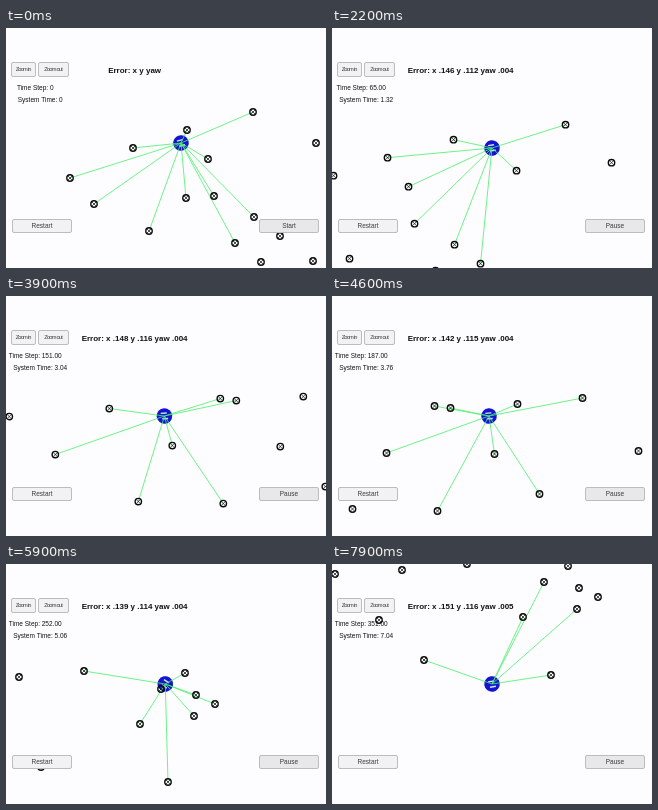
Animation of 320 by 240 pixels, one loop 8 s. Source, as an HTML page with a canvas:

```html
<!DOCTYPE html>
<html lang="en">
<head>
<meta charset="utf-8">
<title>Robot localisation</title>
<style>
  html, body { margin: 0; width: 100%; height: 100%; overflow: hidden; background: #fdfcff; }
  canvas { display: block; }
</style>
</head>
<body>
<canvas id="stage" width="320" height="240"></canvas>
<script>
const ctx = document.getElementById('stage').getContext('2d');
const SANS = '"Liberation Sans", Arial, sans-serif';
const TICK = 100, TICKS = 80, START = 10, RANGE = 119.7;

// The world map: landmark positions
const landmarks = [
  [181, 102], [247, 84], [310, 115], [127, 120], [202, 131], [64, 150], [88, 176],
  [180, 170], [208, 168], [248, 189], [143, 203], [229, 215], [274, 208], [255, 234],
  [307, 233], [359, 69], [459, 61], [405, 107], [522, 98], [488, 154], [570, 51],
  [586, 53], [653, 49], [718, 43], [630, 99], [675, 139], [573, 156], [774, 96],
  [795, 61], [819, 45], [830, 67], [849, 76], [828, 88], [802, 154]
];

// Waypoints of the drive: tick, x, y
const path = [
  [10, 19, -6], [15, 51, -15.5], [31, 235, -42], [46, 467.5, -59], [54, 588, -68],
  [59, 640, -64], [67, 673, -10], [72, 651, 32], [79, 583, 43]
];

function slope(i, k) {
  const a = path[Math.max(i - 1, 0)], b = path[Math.min(i + 1, path.length - 1)];
  return (b[k] - a[k]) / (b[0] - a[0]);
}

// Smooth cubic through the waypoints
function position(t) {
  let i = 0;
  while (i < path.length - 2 && path[i + 1][0] <= t) i++;
  const a = path[i], b = path[i + 1], span = b[0] - a[0];
  const u = (t - a[0]) / span, v = 1 - u;
  return [1, 2].map(k =>
    a[k] * (1 + 2 * u) * v * v + b[k] * u * u * (3 - 2 * u) +
    span * u * v * (slope(i, k) * v - slope(i + 1, k) * u));
}

function heading(t) {
  const a = position(t - .3), b = position(t + .3);
  return Math.atan2(b[1] - a[1], b[0] - a[0]);
}

// The errors settle quickly, then swell and fade
function errorText(t) {
  const settle = Math.exp((15 - t) / 3);
  const swell = Math.cos(Math.PI * (t - 31) / 53) ** 4;
  const show = v => Math.max(v, 0).toFixed(3).slice(1);
  const x = .1393 + .0145 * swell - .018 * settle;
  const y = .1142 + .0024 * swell - .0315 * settle;
  return `Error: x ${show(x)} y ${show(y)} yaw ${show(.004 + t * 6.8e-6)}`;
}

const timeStep = t => Math.round(186.8 + (t - 46) * (t < 46 ? 5.09 : 4.979));

function text(str, x, y, size, { weight = '', spacing = 0, color = '#111' } = {}) {
  ctx.font = `${weight} ${size}px ${SANS}`;
  ctx.letterSpacing = spacing + 'px';
  ctx.textAlign = 'center';
  ctx.textBaseline = 'middle';
  ctx.fillStyle = color;
  ctx.fillText(str, x, y);
}

function button(label, x, y, w, h, size, fill, spacing = 0) {
  ctx.beginPath();
  ctx.roundRect(x, y, w, h, 1.5);
  ctx.fillStyle = fill;
  ctx.fill();
  ctx.strokeStyle = '#bcbcbc';
  ctx.lineWidth = 1;
  ctx.stroke();
  text(label, x + w / 2 + spacing / 2, y + h / 2 + .4, size, { spacing, color: '#3c3c3c' });
}

function line(x1, y1, x2, y2) {
  ctx.beginPath();
  ctx.moveTo(x1, y1);
  ctx.lineTo(x2, y2);
  ctx.stroke();
}

function disc(x, y, r, paint) {
  ctx.beginPath();
  ctx.arc(x, y, r, 0, 7);
  ctx[paint]();
}

function marker(x, y) {
  ctx.strokeStyle = '#0a0a0a';
  ctx.lineWidth = 1.4;
  disc(x, y, 3.2, 'stroke');
  ctx.lineWidth = .7;
  line(x - 2, y - 2, x + 2, y + 2);
  line(x - 2, y + 2, x + 2, y - 2);
}

function robot(x, y, angle) {
  ctx.save();
  ctx.translate(x, y);
  ctx.rotate(angle);
  ctx.fillStyle = '#1414d2';
  disc(0, 0, 7.8, 'fill');
  ctx.fillStyle = '#d4e8ec';
  ctx.fillRect(-3.5, -3.6, 6, 1.4);
  ctx.fillRect(-2.5, 2, 6, 1.4);
  ctx.restore();
}

function draw(t) {
  const running = t >= START;
  const [camX, camY] = running ? position(t) : [0, 0];
  const x = running ? 160 - 3 * Math.exp(-(((t - 47) / 10) ** 2)) : 175;
  const y = running ? 120 : 115;
  const seen = landmarks.map(([lx, ly]) => [lx - camX, ly - camY]);

  ctx.fillStyle = '#fdfcff';
  ctx.fillRect(0, 0, 320, 240);

  robot(x, y, running ? heading(t) : -.25);
  ctx.strokeStyle = '#48f268';
  ctx.lineWidth = .8;
  for (const [lx, ly] of seen)
    if (Math.hypot(lx - x, ly - y) < RANGE) line(x, y, lx, ly);
  for (const [lx, ly] of seen) marker(lx, ly);

  const n = timeStep(t);
  text(running ? errorText(t) : 'Error: x y yaw', 128.6, 43, 8, { weight: 'bold' });
  text('Time Step: ' + (running ? n.toFixed(2) : 0), 29.2, 60.5, 6.5);
  text('System Time: ' + (running ? (n * .02 + .02).toFixed(2) : 0), 34.2, 72.3, 6.5);

  button('Zoom in', 5.5, 34.5, 24, 14, 5.7, '#f2f1f3', -.8);
  button('Zoom out', 32.5, 34.5, 30, 14, 5.7, '#f2f1f3', -.8);
  button('Restart', 6.5, 191.5, 59, 13, 6.5, '#f2f1f3');
  button(running ? 'Pause' : 'Start', 253.5, 191.5, 59, 13, 6.5, '#e8e7e9');
}

function loop() {
  draw(Math.floor(performance.now() / TICK) % TICKS);
  requestAnimationFrame(loop);
}
loop();
</script>
</body>
</html>
```
